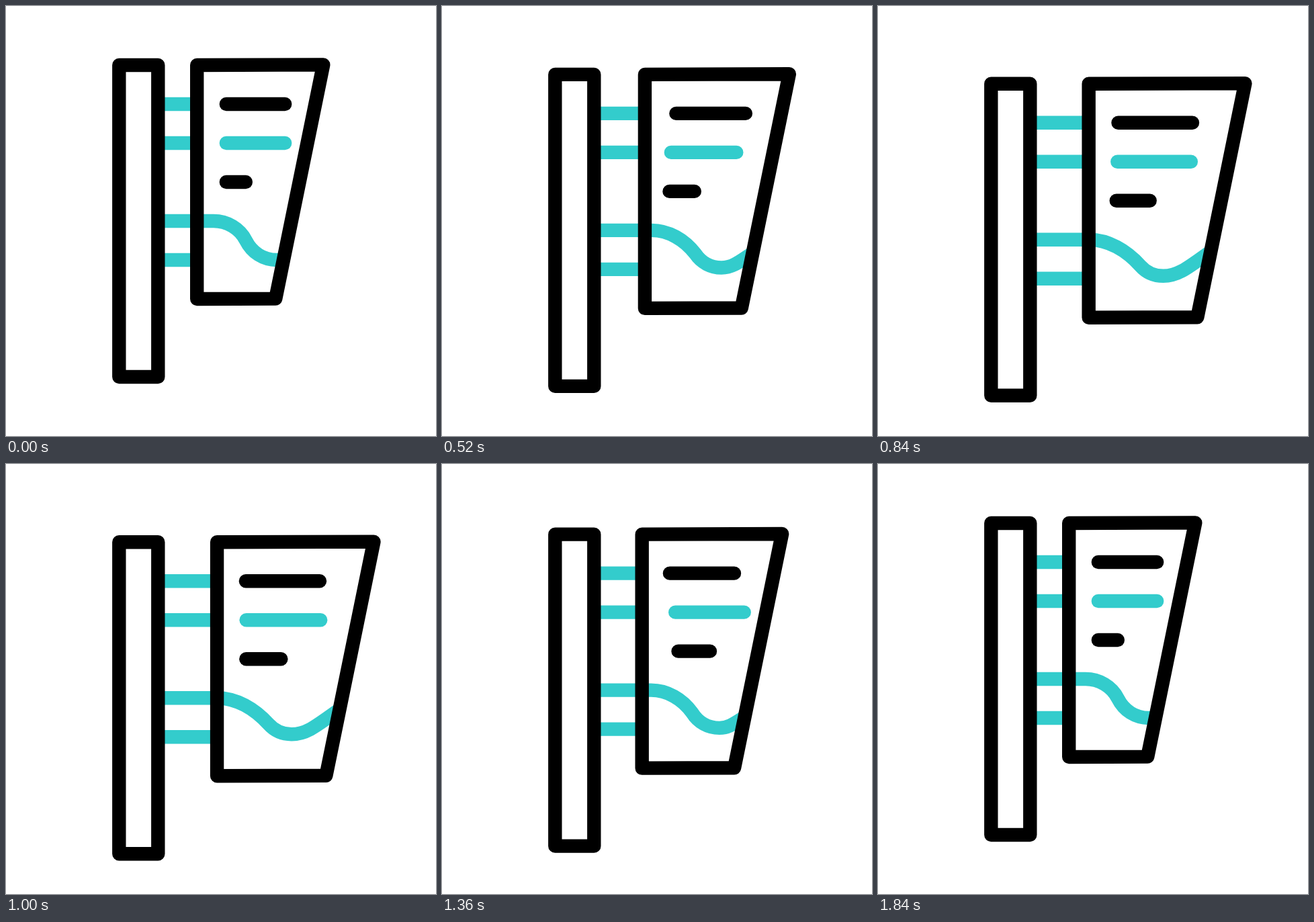
An HTML page with a canvas for the animation above (2000 ms loop, 640 by 640 pixels).

```html
<!DOCTYPE html>
<html lang="en">
<head>
<meta charset="utf-8">
<title>Hanging sign</title>
<style>
html, body { margin: 0; width: 100%; height: 100%; overflow: hidden; background: #fff; }
canvas { display: block; width: 640px; height: 640px; }
</style>
</head>
<body>
<canvas id="stage" width="640" height="640"></canvas>
<script>
const ctx = document.getElementById('stage').getContext('2d');
const LOOP = 2000, END = 1840, STEP = 40;
const BLACK = '#000', CYAN = '#33cccc';

// Ease curve with handles (x1, 0) and (x2, 1)
function ease(u, x1, x2) {
  let lo = 0, hi = 1;
  for (let i = 0; i < 24; i++) {
    const s = (lo + hi) / 2, r = 1 - s;
    const x = 3 * x1 * s * r * r + 3 * x2 * s * s * r + s * s * s;
    if (x < u) lo = s; else hi = s;
  }
  return lo * lo * (3 - 2 * lo);
}

// Goes 0 -> 1 until the peak time, then back to 0 at END
function swing(peak, up, down) {
  return t => {
    if (t <= 0 || t >= END) return 0;
    return t < peak
      ? ease(t / peak, ...up)
      : 1 - ease((t - peak) / (END - peak), ...down);
  };
}

const stretch = swing(960, [0.577, 0.43], [0.393, 0.415]);
const drop = swing(960, [0.67, 0.45], [0.52, 0.472]);

const bars = [
  { y: 146, x2: 415.2, color: BLACK, move: swing(900, [0.582, 0.401], [0.427, 0.375]) },
  { y: 204, x2: 415.2, color: CYAN, move: swing(1000, [0.62, 0.51], [0.577, 0.406]) },
  { y: 262, x2: 356.8, color: BLACK, move: swing(1080, [0.612, 0.52], [0.63, 0.376]) }
];

// Wave points at rest and fully stretched
const waveRest = [309, 320, 329, 320, 348, 331, 357, 349, 366, 367, 383, 378, 403, 378, 407, 378, 410, 378, 413, 378];
const waveFull = [314, 320, 343, 320, 370, 336, 391, 359, 400, 369, 412, 374, 425, 374, 446, 374, 459, 364, 495, 338];

function stroke(color, path, cap = 'butt') {
  ctx.strokeStyle = color;
  ctx.lineCap = cap;
  ctx.beginPath();
  path();
  ctx.stroke();
}

function line(color, x1, x2, y, cap) {
  stroke(color, () => { ctx.moveTo(x1, y); ctx.lineTo(x2, y); }, cap);
}

function outline(points) {
  stroke(BLACK, () => {
    points.forEach(([x, y]) => ctx.lineTo(x, y));
    ctx.closePath();
  });
}

function draw(t) {
  const p = stretch(t);
  const left = 284.2 + 30 * p, shift = 75.5 * p;

  ctx.setTransform(1, 0, 0, 1, 0, 0);
  ctx.fillStyle = '#fff';
  ctx.fillRect(0, 0, 640, 640);
  ctx.translate(0, 28.3 * drop(t));
  ctx.lineWidth = 20.4;
  ctx.lineJoin = 'round';

  for (const y of [146, 204, 378]) line(CYAN, 226, left, y);

  const w = waveRest.map((v, i) => v + (waveFull[i] - v) * p);
  stroke(CYAN, () => {
    ctx.moveTo(226, 320);
    ctx.lineTo(w[0], w[1]);
    for (let i = 2; i < w.length; i += 6) ctx.bezierCurveTo(...w.slice(i, i + 6));
  });

  for (const b of bars) {
    const m = b.move(t);
    line(b.color, 327.8 + 29.8 * m, b.x2 + 53 * m, b.y, 'round');
  }

  outline([[168.3, 88], [226.3, 88], [226.3, 552], [168.3, 552]]);
  outline([[left, 88], [472.3 + shift, 87.4], [401.2 + shift, 435.6], [left, 436]]);
}

const start = performance.now();
function tick() {
  const t = (performance.now() - start) % LOOP;
  draw(Math.floor((t + 1) / STEP) * STEP);
  requestAnimationFrame(tick);
}
draw(0);
requestAnimationFrame(tick);
</script>
</body>
</html>
```
